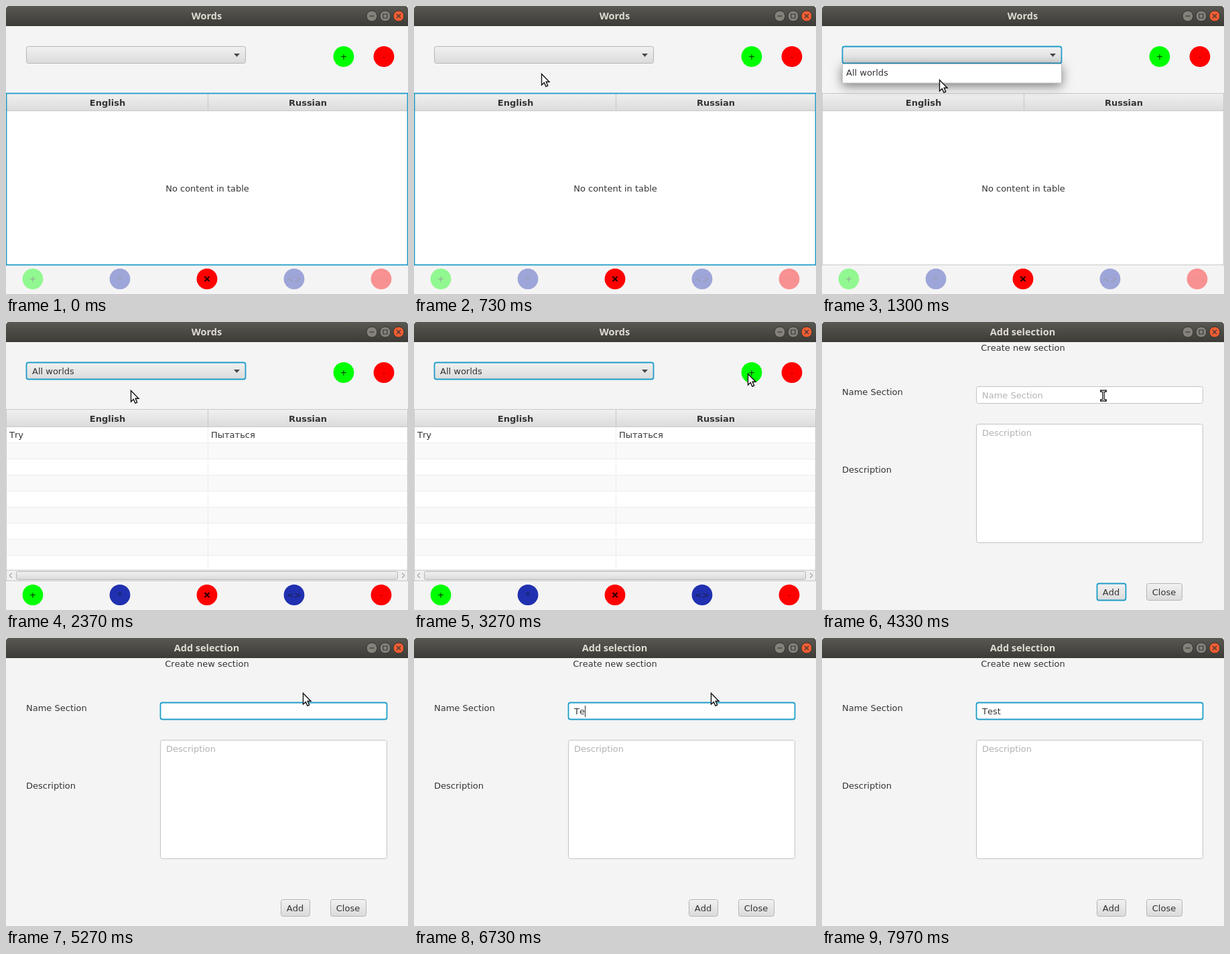
An HTML page for the animation above (8000 ms loop, 600x430 px).

```html
<!DOCTYPE html>
<html lang="en">
<head>
<meta charset="utf-8">
<title>Words</title>
<style>
  html, body { margin: 0; height: 100%; overflow: hidden; background: #f4f4f4; }
  svg { display: block; width: 100vw; height: 100vh; }
  text { font: 13px "DejaVu Sans", sans-serif; font-kerning: none; fill: #333; white-space: pre; }
  .mid { text-anchor: middle; }
  .bold { font-weight: bold; }
  .title { font: bold 14.5px "Noto Sans", sans-serif; fill: #dfdbd2; text-anchor: middle; }
  .prompt { fill: #b2b2b2; }
  .control { fill: url(#control); stroke: #b5b5b5; }
  .field { fill: #fff; stroke: #c2c2c2; }
  .line { fill: none; stroke: #c8c8c8; }
  .focus { stroke: #1e9dc8; stroke-width: 1.8; }
  .inactive .title { fill: #8a887f; }
  .inactive .button { fill: #595751; }
  .window { filter: drop-shadow(0 4px 8px rgba(0, 0, 0, .5)); }
</style>
</head>
<body>
<svg viewBox="0 0 600 430">
  <defs>
    <linearGradient id="bar" x2="0" y2="1">
      <stop stop-color="#595852"/><stop offset="1" stop-color="#3c3b37"/>
    </linearGradient>
    <linearGradient id="control" x2="0" y2="1">
      <stop stop-color="#f1f1f1"/><stop offset="1" stop-color="#dbdbdb"/>
    </linearGradient>
    <path id="frame" d="M0 30V5Q0 0 5 0H595Q600 0 600 5V30Z" fill="url(#bar)"/>
    <path id="beamShape" d="M-3-7H-1.500L0-6 1.500-7H3M0-6V6M-3 7H-1.500L0 6 1.500 7H3"/>
  </defs>
  <rect width="600" height="430" fill="#f4f4f4"/>

  <g id="main">
    <use href="#frame"/>
    <text class="title" x="299.5" y="20">Words</text>
    <g class="buttons"></g>
    <rect id="combo" class="control" x="30.5" y="60.5" width="327" height="25" rx="3"/>
    <path d="M340 71h9l-4.5 5z" fill="#4a4a4a"/>
    <text id="choice" x="39" y="78">All worlds</text>
    <rect y="130" width="600" height="257" fill="#fff"/>
    <rect y="130" width="600" height="27" fill="url(#control)"/>
    <path class="line" d="M0 156.5H600M301.5 131V156"/>
    <text class="mid bold" x="151.5" y="149">English</text>
    <text class="mid bold" x="450.5" y="149">Russian</text>
    <text id="empty" class="mid" x="300.5" y="277">No content in table</text>
    <g id="rows">
      <g id="stripes"></g>
      <path d="M301.5 157V370" stroke="#ededed"/>
      <text x="5" y="173">Try</text>
      <text x="306" y="173">Пытаться</text>
      <rect y="370.5" width="600" height="16" fill="#efefef"/>
      <path class="line" d="M0 370.5H600"/>
      <rect class="control" x="15.5" y="372.5" width="569" height="12" rx="2"/>
      <path d="M9 375l-4 3.5 4 3.5M591 375l4 3.5-4 3.5" fill="none" stroke="#777"/>
    </g>
    <rect id="table" class="line" x=".5" y="130.5" width="599" height="256"/>
    <g id="circles"></g>
    <g id="popup">
      <rect x="30.5" y="86.5" width="327" height="28.5" class="field window"/>
      <text x="36" y="104">All worlds</text>
    </g>
  </g>

  <g id="dialog">
    <rect width="600" height="430" rx="4" fill="#f4f4f4"/>
    <use href="#frame"/>
    <text class="title" x="299.5" y="20">Add selection</text>
    <g class="buttons"></g>
    <text class="mid" x="300" y="43">Create new section</text>
    <text x="30" y="109">Name Section</text>
    <text x="30" y="225">Description</text>
    <rect id="name" class="field" x="230.5" y="96.5" width="338" height="25" rx="3"/>
    <text id="namePrompt" class="prompt" x="239" y="114">Name Section</text>
    <text id="typed" x="239" y="114"></text>
    <path id="caret" d="M0 101V118" stroke="#333"/>
    <rect class="field" x="230.5" y="152.5" width="338" height="177" rx="3"/>
    <text class="prompt" x="239" y="170">Description</text>
    <rect id="add" class="control" x="410.5" y="390.5" width="43" height="25" rx="3"/>
    <text class="mid" x="431.5" y="408">Add</text>
    <rect class="control" x="484.5" y="390.5" width="53" height="25" rx="3"/>
    <text class="mid" x="510.5" y="408">Close</text>
  </g>

  <g id="cursor">
    <path id="arrow" d="M.5 .5V17L4.3 13.500 7 19.300 9.700 18 7.200 12.300H12Z" fill="#fff" stroke="#111" stroke-width="1.400"/>
    <g id="beam" fill="none">
      <use href="#beamShape" stroke="#111" stroke-width="3.600" stroke-linecap="square"/>
      <use href="#beamShape" stroke="#fff" stroke-width="1.200"/>
    </g>
  </g>
</svg>
<script>
const LOOP = 8000;
const el = id => document.getElementById(id);
const show = (id, on) => { el(id).style.display = on ? '' : 'none'; };
const focus = (id, on) => el(id).classList.toggle('focus', on);

// Times of the interactions, in ms
const OPEN_LIST = 1000, PICK = 1850, PRESS_PLUS = 3380, OPEN_DIALOG = 3620,
      FOLLOW_DIALOG = 3850, FOCUS_NAME = 4570, CARET_END = 7900;
const KEYS = [6230, 6730, 7070, 7400];

// Where the dialog opens; the view then jumps to follow it
const OFFSET = [-357, -107.5];

// Pointer stops: time, x, y
const PATH = [
  [100, 330, 440], [850, 180, 76], [1000, 180, 76], [1300, 175, 110], [1600, 186, 102],
  [2400, 186, 102], [3250, 498, 77], [FOLLOW_DIALOG, 498, 77],
  [FOLLOW_DIALOG, 498 - OFFSET[0], 77 - OFFSET[1]], [4330, 420, 110], [4600, 422, 109],
  [5000, 443, 82], [7380, 443, 82], [7990, 434, 436]
];

for (const group of document.querySelectorAll('.buttons')) {
  group.innerHTML = ['M-3.5 0h7', 'M-3-3h6v6h-6z', 'M-3-3l6 6m0-6l-6 6'].map((d, i) =>
    `<g transform="translate(${546 + 20 * i} 15)">
      <circle class="button" r="8" fill="${i < 2 ? '#83817a' : '#f15d33'}" stroke="#33322e"/>
      <path d="${d}" fill="none" stroke="#3a3934" stroke-width="1.2"/></g>`).join('');
}

el('stripes').innerHTML = Array.from({ length: 9 }, (_, i) => {
  const y = 157 + 24 * i, height = Math.min(24, 370 - y);
  return `<rect y="${y}" width="600" height="${height}" fill="${i % 2 ? '#f9f9f9' : '#fff'}"/>` +
    (i ? `<path d="M0 ${y - .5}H600" stroke="#ededed"/>` : '');
}).join('');

const circle = (x, y, color, label, ink, enabled = true) =>
  `<g opacity="${enabled ? 1 : .4}">
    <circle cx="${x}" cy="${y}" r="15.4" fill="${color}"/>
    <text class="mid" x="${x}" y="${y + 4.5}" style="fill:${ink}">${label}</text></g>`;

function drawCircles(enabled) {
  el('circles').innerHTML =
    circle(504, 75.5, '#0f0', '+', '#030') + circle(564, 75.5, '#f00', '-', '#900') +
    circle(40, 407.5, '#0f0', '+', '#030', enabled) +
    circle(170, 407.5, '#2030b0', '*', '#19204e', enabled) +
    circle(300, 407.5, '#f00', '') +
    '<path d="M296.5 404l7 7m0-7l-7 7" stroke="#300" stroke-width="2.4"/>' +
    circle(430, 407.5, '#2030b0', '&lt;&gt;', '#19204e', enabled) +
    circle(560, 407.5, '#f00', '-', '#900', enabled);
}

function pointer(t) {
  const i = PATH.findIndex(stop => stop[0] > t);
  if (i < 1) return [-50, -50];
  const [t0, x0, y0] = PATH[i - 1], [t1, x1, y1] = PATH[i];
  const p = (t - t0) / (t1 - t0), s = p * p * (3 - 2 * p);
  return [x0 + (x1 - x0) * s, y0 + (y1 - y0) * s];
}

function drawDialog(t) {
  const following = t >= FOLLOW_DIALOG;
  const p = Math.min(1, (t - OPEN_DIALOG) / 150);
  const scale = p < 1 ? 1 - .95 * 2 ** (-10 * p) : 1;
  const [dx, dy] = following ? [0, 0] : OFFSET;
  const dialog = el('dialog');
  dialog.setAttribute('transform',
    `translate(${300 + dx} ${215 + dy}) scale(${scale}) translate(-300 -215)`);
  dialog.classList.toggle('window', !following);

  const editing = t >= FOCUS_NAME;
  focus('add', !editing);
  focus('name', editing);
  show('namePrompt', !editing);
  const typed = el('typed');
  typed.textContent = 'Test'.slice(0, KEYS.filter(key => t >= key).length);
  const blinkedOff = (t >= 5070 && t < 5570) || t >= CARET_END;
  show('caret', editing && !blinkedOff);
  const width = typed.textContent ? typed.getComputedTextLength() : 0;
  el('caret').setAttribute('transform', `translate(${Math.round(239 + width) + .5} 0)`);
}

let wasEnabled;
function render(t) {
  const picked = t >= PICK, dialogOpen = t >= OPEN_DIALOG;
  if (picked !== wasEnabled) drawCircles(wasEnabled = picked);
  show('main', t < FOLLOW_DIALOG);
  show('popup', t >= OPEN_LIST && !picked);
  show('choice', picked);
  show('rows', picked);
  show('empty', !picked);
  focus('table', t < OPEN_LIST);
  focus('combo', t >= OPEN_LIST && t < PRESS_PLUS);
  el('main').classList.toggle('inactive', dialogOpen);
  show('dialog', dialogOpen);
  if (dialogOpen) drawDialog(t);

  const [x, y] = pointer(t);
  const overName = t >= FOLLOW_DIALOG && x > 230 && x < 569 && y > 96 && y < 122;
  show('beam', overName);
  show('arrow', !overName);
  el('cursor').setAttribute('transform', `translate(${Math.round(x)} ${Math.round(y)})`);
}

function tick() {
  render(performance.now() % LOOP);
  requestAnimationFrame(tick);
}
tick();
</script>
</body>
</html>
```
